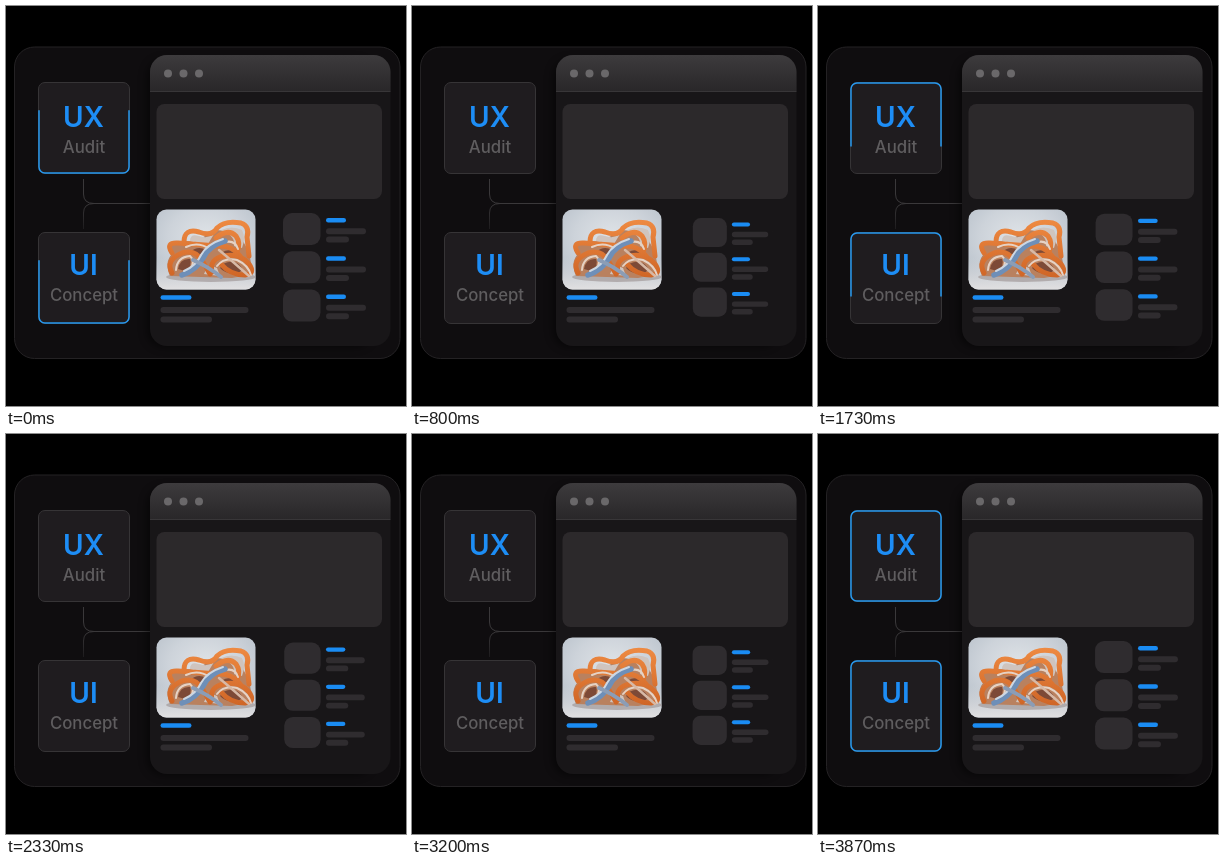
Animation, 400 px wide and 400 px high, one loop 3940 ms. Source, as an HTML page:

```html
<!DOCTYPE html>
<html lang="en">
<head>
<meta charset="utf-8">
<title>UX audit and UI concept</title>
<style>
  html, body { margin: 0; width: 100%; height: 100%; overflow: hidden; background: #000; }
  svg { display: block; width: 100vw; height: 100vh; }
  text { font-family: Inter, "Open Sans", sans-serif; text-anchor: middle; }
  .title { font-size: 28px; font-weight: 600; fill: #1d8df5; }
  .label { font-size: 16.8px; font-weight: 500; fill: #5f5d5f; }
  .blue { fill: #1a8cf3; }
  .grey { fill: #2f2c2f; }
</style>
</head>
<body>
<svg viewBox="0 0 400 400">
  <defs>
    <linearGradient id="header" x2="0" y2="1">
      <stop stop-color="#3d3b3d"/><stop offset="1" stop-color="#292729"/>
    </linearGradient>
    <linearGradient id="wire" gradientUnits="userSpaceOnUse" x1="0" y1="172" x2="0" y2="224">
      <stop stop-color="#3a383a"/><stop offset=".5" stop-color="#3a383a"/><stop offset="1" stop-color="#1c1a1c"/>
    </linearGradient>
    <radialGradient id="backdrop" cx=".5" cy=".35" r=".75">
      <stop stop-color="#dfe3e7"/><stop offset=".5" stop-color="#cdd3da"/><stop offset="1" stop-color="#b3bcc6"/>
    </radialGradient>
    <linearGradient id="floor" x2="0" y2="1">
      <stop stop-color="#d9dadd" stop-opacity="0"/><stop offset="1" stop-color="#e2e1e2"/>
    </linearGradient>
    <linearGradient id="orange" gradientUnits="userSpaceOnUse" x1="0" y1="214" x2="0" y2="272">
      <stop stop-color="#ee8a42"/><stop offset="1" stop-color="#cf6526"/>
    </linearGradient>
    <filter id="soft" x="-20%" width="140%" y="-20%" height="140%"><feGaussianBlur stdDeviation="4"/></filter>
    <clipPath id="window"><rect x="144" y="49" width="240.5" height="291" rx="17"/></clipPath>
    <clipPath id="photo"><rect x="150.5" y="203.5" width="99" height="80" rx="10"/></clipPath>
    <clipPath id="reveal"><rect id="band" x="30" width="96"/></clipPath>
  </defs>

  <rect width="400" height="400"/>
  <rect x="8.5" y="41" width="385.5" height="311.5" rx="20" fill="#0f0d0f" stroke="#242224"/>

  <path d="M77.5 173V188Q77.500 197.500 88 197.500H144M77.500 223V207Q77.500 197.500 88 197.500" fill="none" stroke="url(#wire)"/>

  <rect x="141" y="54" width="225" height="287" rx="16" fill="#000" opacity=".5" filter="url(#soft)"/>
  <g clip-path="url(#window)">
    <rect x="144" y="49" width="241" height="291" fill="#181618"/>
    <rect x="144" y="49" width="241" height="36" fill="url(#header)"/>
    <path d="M144 85.500H385" stroke="#383638"/>
  </g>
  <g fill="#6a686a">
    <circle cx="162" cy="67.500" r="4"/><circle cx="177.500" cy="67.500" r="4"/><circle cx="193" cy="67.500" r="4"/>
  </g>
  <rect x="150.500" y="98" width="225.500" height="95" rx="8" fill="#2c292b"/>

  <g clip-path="url(#photo)" fill="none" stroke-linecap="round" stroke-linejoin="round">
    <rect x="150" y="203" width="100" height="81" fill="url(#backdrop)"/>
    <rect x="150" y="252" width="100" height="32" fill="url(#floor)"/>
    <ellipse cx="205" cy="271" rx="45" ry="5" fill="#a39a9a" opacity=".7"/>
    <path d="M164 238Q178 233 188 236L210 224 232 226 243 246 247 268 226 272 164 270Q158 256 166 248Z" fill="#b9815f"/>
    <g fill="#cfc4be">
      <path d="M184 235Q184 227 193 230Q202 233 208 228L202 238Z"/>
      <path d="M215 224Q226 219 236 224Q240 232 236 242L228 240Q230 230 215 224Z"/>
      <path d="M198 268Q202 258 211 262L214 270Z"/>
    </g>
    <g fill="#7d4a37">
      <path d="M172 263Q174 252 184 253Q187 260 179 265Z"/>
      <path d="M214 262Q220 253 231 257Q240 263 232 267Q220 269 214 262Z"/>
      <path d="M184 246Q192 239 200 244L192 250Z"/>
      <path d="M215 247Q224 241 232 247L226 250Z"/>
    </g>
    <g stroke="url(#orange)" stroke-width="5">
      <path d="M166 247Q159 236 172 237L212 240Q226 239 234 250"/>
      <path d="M178 236Q178 222 193 226Q206 231 211 222Q219 214 235 217Q244 220 241 231L243 250"/>
      <path d="M210 232Q222 222 230 230Q235 237 231 246"/>
      <path d="M166 267Q159 254 176 247Q190 243 197 256L204 268"/>
      <path d="M206 266Q203 253 218 250Q234 247 243 258Q250 268 239 269Q224 269 215 258"/>
    </g>
    <g stroke="#e6d2c4" stroke-width="2">
      <path d="M170 264Q171 251 184 250Q190 255 184 264"/>
      <path d="M211 260Q218 251 231 254Q242 259 245 269"/>
      <path d="M180 241Q192 235 204 243M220 236Q229 234 232 243"/>
    </g>
    <path d="M176 269Q190 264 197 252Q203 239 219 235" stroke="#6e8fb8" stroke-width="5.500"/>
    <path d="M178 265Q190 260 195 249Q201 238 217 233" stroke="#cdd7e2" stroke-width="2"/>
    <path d="M187 254Q203 261 215 271" stroke="#8b9db6" stroke-width="4"/>
    <path d="M213 244Q225 254 243 270" stroke="#d7b9a6" stroke-width="2.500"/>
  </g>
  <rect class="blue" x="154.500" y="289.200" width="31" height="4.600" rx="2.300"/>
  <rect class="grey" x="154.500" y="301" width="88" height="6" rx="3"/>
  <rect class="grey" x="154.500" y="310.500" width="51.500" height="6" rx="3"/>

  <g id="list"></g>
  <g id="cards"></g>
</svg>
<script>
  const LOOP = 3940, CYCLE = LOOP / 2;
  const PIVOT = { x: 318.5, y: 261.5 };
  const byId = id => document.getElementById(id);

  const bar = (kind, x, y, w, h, r) =>
    `<rect class="${kind}" x="${x}" y="${y}" width="${w}" height="${h}" rx="${r}"/>`;

  byId("list").innerHTML = [207, 245.3, 283.6].map(y =>
    bar("grey", 277, y, 37.5, 32, 9) +
    bar("blue", 320, y + 5, 20, 4.4, 2.2) +
    bar("grey", 320, y + 15.2, 40, 6, 3) +
    bar("grey", 320, y + 23.6, 23, 6, 3)).join("");

  const card = (title, label, top, baseline) => `
    <g transform="translate(0 ${top})">
      <rect x="32.5" y=".5" width="91" height="91" rx="6.5" fill="#1f1c1f" stroke="#363436"/>
      <rect x="33" y="1" width="90" height="90" rx="6" fill="none" stroke="#2698ee"
        stroke-width="1.5" clip-path="url(#reveal)"/>
      <text class="title" x="77.5" y="${baseline}">${title}</text>
      <text class="label" x="78" y="${baseline + 26.3}">${label}</text>
    </g>`;
  byId("cards").innerHTML =
    card("UX", "Audit", 76, 44.5) + card("UI", "Concept", 226, 42.7);

  // Progress from 0 to 1 between two times, slowing towards the end.
  const sweep = (t, start, end) => {
    const u = Math.min(1, Math.max(0, (t - start) / (end - start)));
    return 1 - (1 - u) ** 1.25;
  };

  function render(ms) {
    const t = ms % CYCLE;
    const scale = 0.95 + 0.05 * Math.cos(2 * Math.PI * t / CYCLE);
    byId("list").setAttribute("transform",
      `translate(${PIVOT.x} ${PIVOT.y}) scale(${scale}) translate(${-PIVOT.x} ${-PIVOT.y})`);

    // The outline draws downwards late in a cycle and is wiped as the next begins.
    const s = t < CYCLE / 2 ? t + CYCLE : t;
    const top = -1 + 94 * sweep(s, 1902, 2170);
    const bottom = -1 + 94 * sweep(s, 1540, 1850);
    byId("band").setAttribute("y", top);
    byId("band").setAttribute("height", Math.max(0, bottom - top));
  }

  const began = performance.now();
  function tick() {
    render((performance.now() - began) % LOOP);
    requestAnimationFrame(tick);
  }
  render(0);
  requestAnimationFrame(tick);
</script>
</body>
</html>
```
